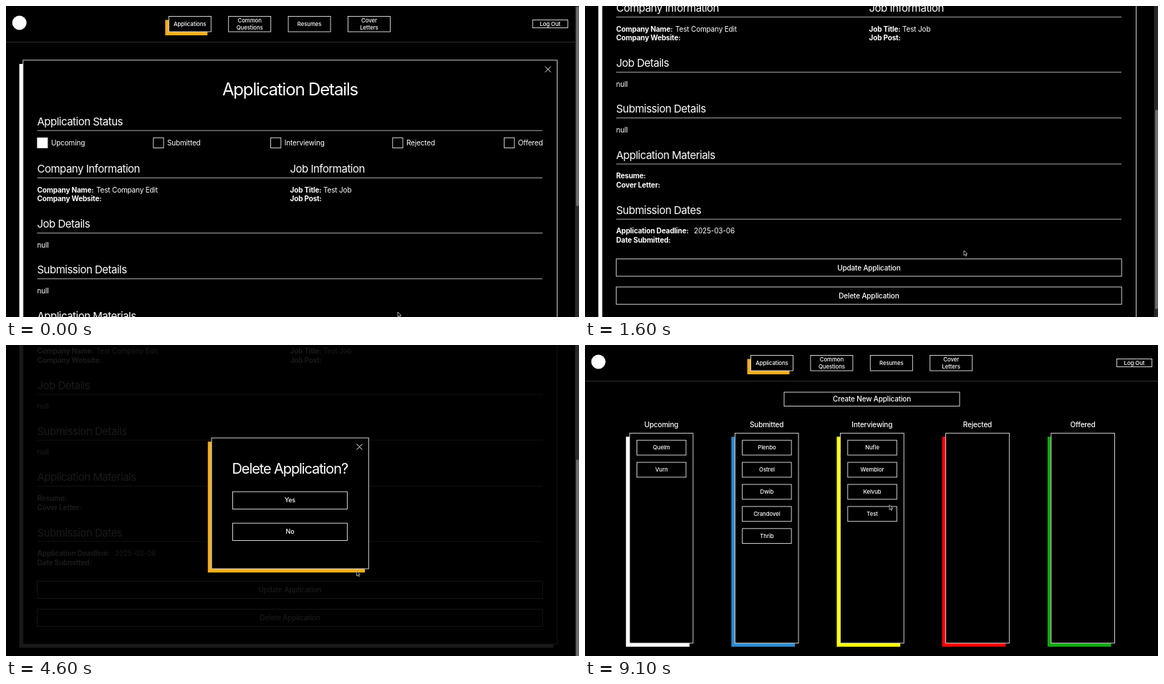
These frames come from a looping animation (800x435 px, 9.2 s). An HTML page:

```html
<!DOCTYPE html>
<html lang="en">
<head>
<title>Application tracker</title>
<style>
  html, body { margin: 0; width: 100%; height: 100%; overflow: hidden; background: #000; }
  svg { display: block; width: 800px; height: 435px; }
  text { font: 10px Inter, "Open Sans", sans-serif; letter-spacing: -.17px; fill: #fff; }
  .bold { font-weight: 700; }
  .mid { text-anchor: middle; font-weight: 500; }
  .small { font-size: 7.8px; letter-spacing: -.08px; }
  .answer { font-size: 9px; }
  .heading { font-size: 15px; letter-spacing: -.5px; }
  .title { font-size: 24px; letter-spacing: -1.15px; font-weight: 400; }
  .question { font-size: 20px; letter-spacing: -1.1px; font-weight: 400; }
</style>
</head>
<body>
<svg id="stage" viewBox="0 0 800 435"></svg>
<script>
const LOOP = 9200, STEP = 100;
const AMBER = '#f2ae1b';
const $ = id => document.getElementById(id);

const text = (x, y, str, cls = '') => `<text x="${x}" y="${y}" class="${cls}">${str}</text>`;
const fill = (x, y, w, h, color, id = '') =>
  `<rect ${id && `id="${id}"`} x="${x}" y="${y}" width="${w}" height="${h}" fill="${color}"/>`;
const box = (x, y, w, h, bg = '#000') =>
  `<rect x="${x}" y="${y}" width="${w}" height="${h}" fill="${bg}" stroke="#e4e4e4" stroke-width=".9"/>`;
const rule = (y, x1 = 43.5, x2 = 749, color = '#bbb') =>
  `<path d="M${x1} ${y}H${x2}" stroke="${color}" stroke-width=".9"/>`;
const cross = (x, y) =>
  `<path d="M${x - 4} ${y - 4}l8 8m0-8l-8 8" stroke="#fff" stroke-width=".9"/>`;
const shadowed = (x, y, w, h, color, offset, id) =>
  fill(x - offset, y + offset, w, h, color, id) + box(x, y, w, h);
const button = (x, y, w, h, label, cls = '', drop = 3.6) =>
  box(x, y, w, h) + text(x + w / 2, y + h / 2 + drop, label, 'mid ' + cls);

function header(shift, logOutX) {
  const links = [['Applications'], ['Common', 'Questions'], ['Resumes'], ['Cover', 'Letters']];
  const nav = links.map((lines, i) => {
    const x = 227.3 + shift + i * 83.4;
    const frame = i ? box(x, 14.5, 59, 21.5) : shadowed(x, 14.5, 59, 21.5, AMBER, 5);
    return frame + lines.map((line, k) =>
      text(x + 29.5, 27.8 + (k - (lines.length - 1) / 2) * 10, line, 'mid small')).join('');
  }).join('');
  return `<circle cx="18.7" cy="23.5" r="10" fill="#fff"/>` + nav +
    button(logOutX, 19.5, 49, 11, 'Log Out', 'small', 2.8) + rule(50.5, 0, 800, '#333');
}

function details() {
  const statuses = [['Upcoming', 43.5], ['Submitted', 205.5], ['Interviewing', 369.3],
    ['Rejected', 539.5], ['Offered', 695.3]];
  const section = (y, label) => text(43.5, y, label, 'heading') + rule(y + 7.2);
  const field = (x, y, label, valueX, value) =>
    text(x, y, label, 'bold') + (value ? text(valueX, y, value) : '');
  return header(0, 735.3) +
    shadowed(23.8, 75.8, 745.7, 591, '#fff', 5.2) + cross(756.7, 88.6) +
    text(396.5, 125.3, 'Application Details', 'mid title') +
    section(167, 'Application Status') +
    statuses.map(([label, x], i) =>
      box(x + .3, 184.3, 14.2, 14.2, i ? '#000' : '#fff') + text(x + 19.5, 195, label)).join('') +
    section(233.2, 'Company Information') + text(396.5, 233.2, 'Job Information', 'heading') +
    field(43.5, 260.6, 'Company Name:', 126, 'Test Company Edit') +
    field(43.5, 273.2, 'Company Website:') +
    field(396.5, 260.6, 'Job Title:', 443, 'Test Job') + field(396.5, 273.2, 'Job Post:') +
    section(310.4, 'Job Details') + text(43.5, 337.6, 'null') +
    section(374.4, 'Submission Details') + text(43.5, 401.8, 'null') +
    section(438.8, 'Application Materials') +
    field(43.5, 466.2, 'Resume:') + field(43.5, 479, 'Cover Letter:') +
    section(516, 'Submission Dates') +
    field(43.5, 543.2, 'Application Deadline:', 152, '2025-03-06') +
    field(43.5, 556, 'Date Submitted:') +
    fill(41, 581.5, 706, 24.3, '#e0a228', 'updateShadow') +
    button(43.7, 578.8, 705.5, 24.2, 'Update Application') +
    fill(41, 620.7, 706, 24.3, '#e0a228', 'deleteShadow') +
    button(43.7, 618, 705.5, 24.2, 'Delete Application');
}

function modal() {
  return shadowed(287, 130, 219.3, 183, AMBER, 5.2) + cross(493.5, 142.5) +
    text(396.3, 179.5, 'Delete Application?', 'mid question') +
    fill(311.5, 210, 160, 24.5, '#fbb40f', 'yesShadow') +
    button(316.5, 205.2, 160, 24.3, 'Yes', 'answer', 3) +
    button(316.5, 249.2, 160, 24.3, 'No', 'answer', 3);
}

function board() {
  const columns = [
    ['Upcoming', '#fff', 'Quelm', 'Vurn'],
    ['Submitted', '#2b8bd0', 'Plenbo', 'Ostrel', 'Dwib', 'Crandovel', 'Thrib'],
    ['Interviewing', '#ff0', 'Nufle', 'Wemblor', 'Kelvub', 'Test'],
    ['Rejected', '#f00'],
    ['Offered', '#10a810'],
  ];
  return header(4.2, 742.5) + button(278, 66, 245, 19.5, 'Create New Application') +
    columns.map(([name, color, ...cards], c) => {
      const x = 62.2 + c * 147.15;
      return text(x + 44.3, 115, name, 'mid') + shadowed(x, 123.3, 88.7, 293.7, color, 5) +
        cards.map((card, i) => {
          const y = 133.2 + i * 30.9;
          const glow = c === 2 && i === 2 ? fill(x + 7.7, y + 2.6, 68.5, 20.8, color, 'cardShadow') : '';
          return glow + button(x + 10.3, y, 68.5, 20.8, card, 'small', 2.8);
        }).join('');
    }).join('');
}

$('stage').innerHTML = `
  <rect width="800" height="435"/>
  <g id="detailsView">
    <g id="page">${details()}</g>
    <g id="overlay">${fill(0, 0, 794.5, 435, '#000', 'dim')}<g id="modal">${modal()}</g></g>
    ${fill(794.5, 0, 5.5, 435, '#2a2a2a')}
    <rect id="thumb" x="796" width="4" height="279" rx="2" fill="#6c6c6c"/>
  </g>
  <g id="boardView"><rect width="800" height="435"/>${board()}</g>
  <g id="cursor">
    <path id="arrow" d="M0 0V6.8L1.6 5.4L2.7 7.8L3.8 7.3L2.7 5H4.8Z" fill="#000" stroke="#ccc" stroke-width=".8"/>
    <path id="hand" d="M-.8 0H.5V2.8L3.5 3.5V6L2.6 8H-.9L-3 5L-2.3 4.2L-.8 5.2Z"
      fill="#fff" stroke="#000" stroke-width=".5"/>
  </g>`;

// Linear interpolation through [time, value] pairs.
function track(t, keys) {
  const next = keys.findIndex(([time]) => time > t);
  if (next < 0) return keys[keys.length - 1][1];
  if (next === 0) return keys[0][1];
  const [t0, a] = keys[next - 1], [t1, b] = keys[next];
  return a + (b - a) * (t - t0) / (t1 - t0);
}
const show = (id, on) => $(id).setAttribute('visibility', on ? 'inherit' : 'hidden');
const fade = (id, value) => $(id).setAttribute('opacity', value);
const within = (t, from, to) => t >= from && t < to;

const SCROLL = [[900, 0], [1000, 30], [1100, 105], [1200, 147], [1400, 147],
  [1500, 175], [1600, 225], [1700, 248.5]];
const CURSOR_X = [[0, 547], [900, 529], [2100, 529], [2200, 528], [4200, 528], [4700, 480],
  [5300, 434], [7500, 434], [8200, 425]];
const CURSOR_Y = [[0, 428], [900, 342], [2100, 342], [2200, 355], [2700, 380.5], [4200, 380.5],
  [4700, 300], [5300, 217], [6400, 217], [7400, 215.5], [7500, 215.5], [8200, 223.7]];

function draw(t) {
  const scroll = track(t, SCROLL);
  const onUpdate = within(t, 2200, 2300), onDelete = within(t, 2500, 4000);
  const onYes = within(t, 5300, 6700), onCard = within(t, 7400, 7600);

  $('page').setAttribute('transform', `translate(0 ${-scroll})`);
  $('thumb').setAttribute('y', 1 + scroll * .64);
  show('updateShadow', onUpdate);
  show('deleteShadow', onDelete);
  show('yesShadow', onYes);
  show('cardShadow', onCard);

  fade('dim', track(t, [[3800, 0], [4400, .9]]));
  fade('modal', track(t, [[3800, 0], [4400, 1], [6300, 1], [6700, 0]]));
  show('boardView', t >= 6700);
  fade('boardView', track(t, [[6600, 0], [7100, 1]]));

  const hand = onUpdate || onDelete || onYes || onCard;
  show('hand', hand);
  show('arrow', !hand);
  $('cursor').setAttribute('transform', `translate(${track(t, CURSOR_X)} ${track(t, CURSOR_Y)})`);
}

const start = performance.now();
function tick() {
  const t = (performance.now() - start) % LOOP;
  draw(Math.floor(t / STEP) * STEP);
  requestAnimationFrame(tick);
}
tick();
</script>
</body>
</html>
```
